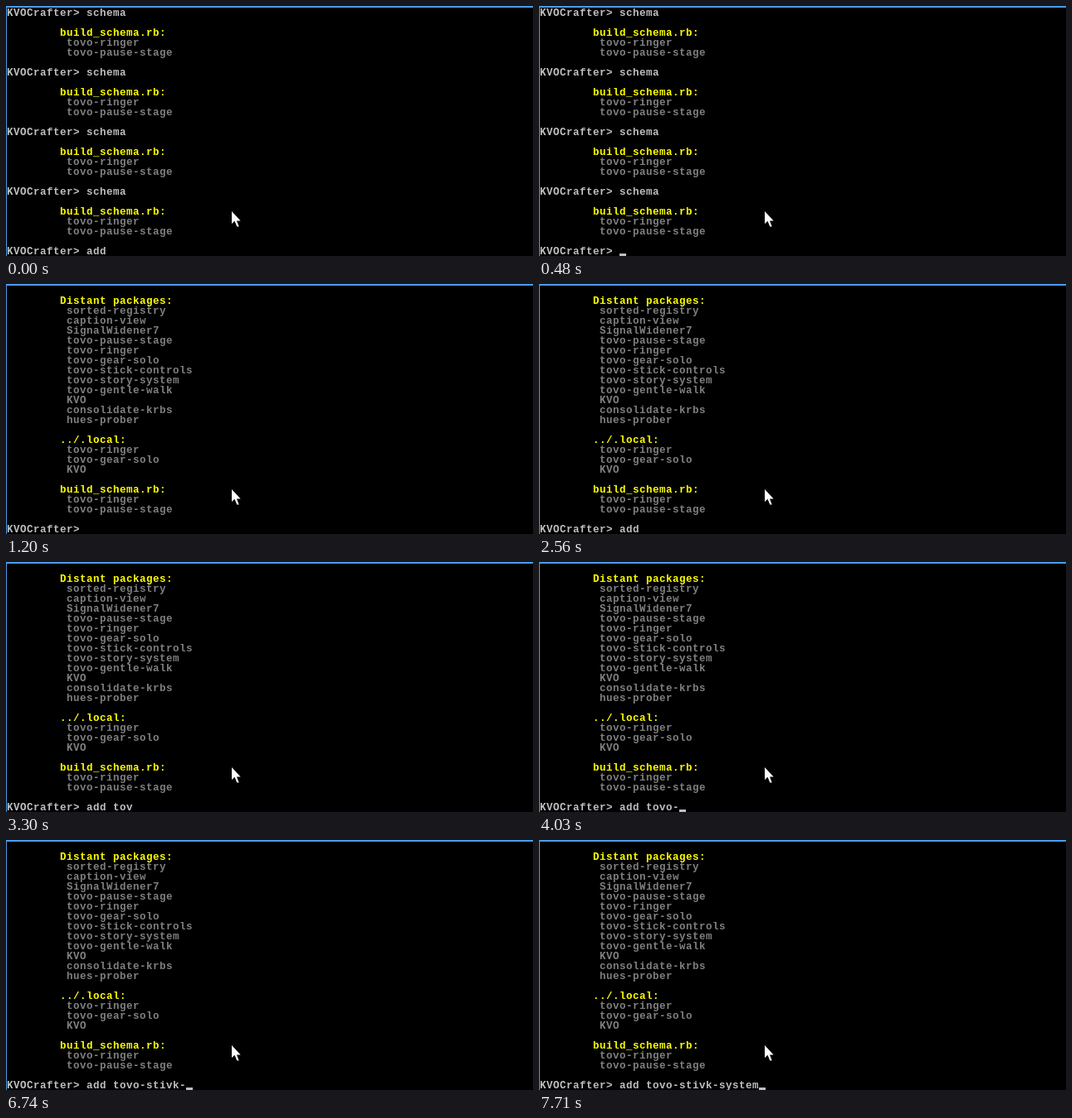
Recreate the animation shown at these times as an HTML page. Size 635 px wide and 302 px high, loop 8000 ms.

```html
<!DOCTYPE html>
<html lang="en">
<head>
<meta charset="utf-8">
<title>Console</title>
<style>
html, body { margin: 0; width: 100%; height: 100%; overflow: hidden; background: #000; }
#stage { position: relative; width: 635px; height: 302px; overflow: hidden; background: #000; }
#stage::before {
  content: ""; position: absolute; inset: 0;
  border-top: 2px solid #4c9be8; border-left: 1px solid #4c9be8;
}
pre {
  position: absolute; left: 1px; top: 3px; margin: 0;
  font: bold 12.5px/12px "Liberation Mono", monospace; letter-spacing: .5px;
  font-variant-ligatures: none; color: #c0c0c0;
}
.head { color: #ff0; }
.item { color: #808080; }
#line { top: 291px; }
#caret { position: absolute; top: 299px; width: 8px; height: 3px; background: #c0c0c0; }
svg { position: absolute; left: 271px; top: 246px; }
</style>
</head>
<body>
<div id="stage">
  <pre id="before"></pre>
  <pre id="after"></pre>
  <pre id="line"></pre>
  <div id="caret"></div>
  <svg width="14" height="23"><path d="M1 2V17L4.5 13.8 7.3 20.5H9.7L7 13.4H11.6Z" fill="#fff"/></svg>
</div>
<script>
const LOOP = 8000, CELL = 8, LEFT = 1;
const PROMPT = 'KVOCrafter> ';
const $ = id => document.getElementById(id);

const head = s => `        <span class="head">${s}:</span>\n`;
const items = s => s.split(' ').map(n => `         <span class="item">${n}</span>\n`).join('');
const group = (title, names) => head(title) + items(names) + '\n';
const schema = group('build_schema.rb', 'tovo-ringer tovo-pause-stage');

$('before').innerHTML = (PROMPT.replace('>', '&gt;') + 'schema\n\n' + schema).repeat(4);
$('after').innerHTML = '\n' +
  group('Distant packages', 'sorted-registry caption-view SignalWidener7 tovo-pause-stage ' +
    'tovo-ringer tovo-gear-solo tovo-stick-controls tovo-story-system tovo-gentle-walk ' +
    'KVO consolidate-krbs hues-prober') +
  group('../.local', 'tovo-ringer tovo-gear-solo KVO') +
  schema;

// Each step: time, typed text, caret visible
const steps = [];
const step = (time, text, caret = false) => steps.push([time, text, caret]);
const type = (time, base, letters) =>
  [...letters].forEach((_, i) => step(time + i * 120, base + letters.slice(0, i + 1)));

step(0, 'add');
step(120, 'ad');
step(240, 'a');
step(360, '');
step(480, '', true);
type(720, '', 'show');
step(1200, '');
step(1940, '', true);
step(2190, 'a');
type(2440, 'a', 'dd');
type(2810, 'add', ' to');
type(3300, 'add to', 'vo');
step(3540, 'add tovo', true);
step(4030, 'add tovo-', true);
step(4280, 'add tovo-s');
type(4530, 'add tovo-s', 'tivk');
const typo = 'add tovo-stivk';
step(5130, typo, true);
step(5630, typo);
step(6130, typo, true);
step(6500, typo + '-');
step(6740, typo + '-', true);
type(7110, typo + '-', 'syste');
step(7710, typo + '-system', true);

function draw(now) {
  const t = now % LOOP;
  const [, text, caret] = steps.findLast(s => s[0] <= t);
  const listed = t >= 1200;
  $('before').hidden = listed;
  $('after').hidden = !listed;
  $('line').textContent = PROMPT + text;
  $('caret').hidden = !caret;
  $('caret').style.left = LEFT + CELL * (PROMPT.length + text.length) + 'px';
}

const start = performance.now();
function tick() {
  draw(performance.now() - start);
  requestAnimationFrame(tick);
}
tick();
</script>
</body>
</html>
```
